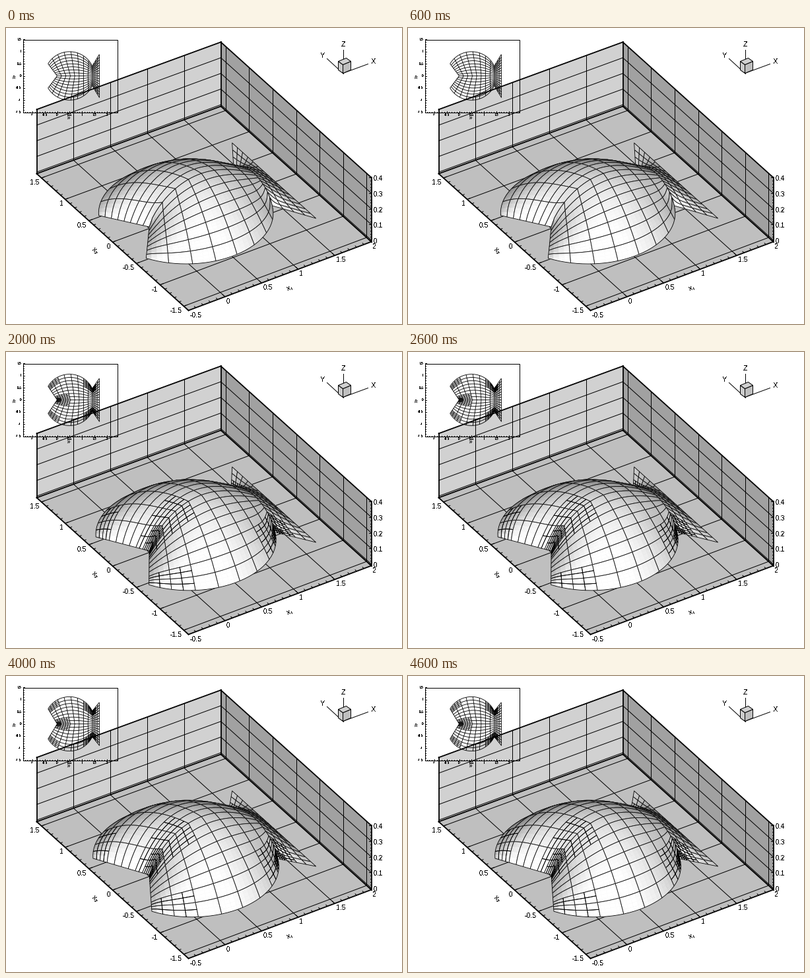
Recreate the animation shown at these times as a matplotlib script. Size 600 by 448 pixels, loop 5000 ms.

```python
import numpy as np
import matplotlib.pyplot as plt
from matplotlib.animation import FuncAnimation
from matplotlib.collections import LineCollection, PolyCollection

W, H, DPI = 600, 448, 100
PX = 72 / DPI
plt.rcParams["font.family"] = "Liberation Sans"
plt.rcParams["text.antialiased"] = False

STEPS = 5
NU, NECK, NV, SUB = 12, 8, 8, 4      # columns, dome columns, rows per half, fine cells
X0, X1, Y0, Y1 = -0.5, 2.0, -1.6, 1.6
Z0, Z1, ZPX = -0.01, 0.4, 237
VIEW = np.array([-0.443, -0.682, 0.58])
ZSCALE = 2.22


def project(x, y, z):
    a, b = (x - X0) / (X1 - X0), (y - Y0) / (Y1 - Y0)
    px = 276 + 277 * a - 230 * b + 2 * a * b
    py = 427 - 104 * a - 207 * b + 2 * a * b - ZPX * (z - Z0)
    return np.stack([px, py], -1)


def half_mesh(shift):
    """Upper half of the domain: notch, shifted circle, flared end."""
    u = np.linspace(0, NU, NU * SUB + 1)
    v = np.linspace(0, 1, NV * SUB + 1)
    axis = np.interp(u, [0, NECK, NU], [0, 1.42, 1.7])
    ang = np.radians(np.interp(u, [0, NECK], [150, 24]))
    t = np.clip((u - NECK) / (NU - NECK), 0, 1)
    rx = (0.5 + np.cos(ang)) * (1 - t) + 1.7 * t
    ry = (np.sin(ang) + shift) * (1 - t) + 0.89 * t
    return axis[:, None] + np.outer(rx - axis, v), np.outer(ry, v)


def poisson(x, y):
    """Bilinear elements for -lap(u) = 1, zero on the outer boundary."""
    idx = np.arange(x.size).reshape(x.shape)
    conn = np.stack([idx[:-1, :-1], idx[1:, :-1], idx[1:, 1:], idx[:-1, 1:]], -1).reshape(-1, 4)
    ex, ey = x.ravel()[conn], y.ravel()[conn]
    K, f = np.zeros((x.size, x.size)), np.zeros(x.size)
    g = 1 / np.sqrt(3)
    sx, sy = np.array([-1, 1, 1, -1]), np.array([-1, -1, 1, 1])
    ke = 0
    for p in (-g, g):
        for q in (-g, g):
            n = (1 + sx * p) * (1 + sy * q) / 4
            dp, dq = sx * (1 + sy * q) / 4, sy * (1 + sx * p) / 4
            a, b, c, d = ex @ dp, ey @ dp, ex @ dq, ey @ dq
            det = a * d - b * c
            gx = (np.outer(d, dp) - np.outer(b, dq)) / det[:, None]
            gy = (np.outer(a, dq) - np.outer(c, dp)) / det[:, None]
            w = np.abs(det)[:, None]
            ke = ke + w[:, :, None] * (gx[:, :, None] * gx[:, None] + gy[:, :, None] * gy[:, None])
            np.add.at(f, conn, w * n)
    np.add.at(K, (conn[:, :, None], conn[:, None, :]), ke)
    free = idx[1:-1, :-1].ravel()
    z = np.zeros(x.size)
    z[free] = np.linalg.solve(K[np.ix_(free, free)], f[free])
    return z.reshape(x.shape)


def level(i, r, step):
    """Refinement of column i, row r counted from the symmetry line."""
    if step == 0:
        return 0
    out = NV - 1 - r
    if step > 1 and ((i == 0 and r == 0) or (i in (7, 8) and out == 0)):
        return 2
    tip = i < 2 and out < 2 and i + out < 1 + min(step, 2)
    corner = i < 3 and r < 2
    neck = 6 <= i <= 9 and out < 3
    return int(tip or corner or neck)


def loop(a, i, j, n):
    """Nodes around a block of n by n fine cells."""
    return np.concatenate([a[i:i + n, j], a[i + n, j:j + n],
                           a[i + n:i:-1, j + n], a[i, j + n:j:-1]])


def build(step):
    x, y = half_mesh(0.03 * step)
    z = poisson(x, y)
    x = np.hstack([x[:, :0:-1], x])
    y = np.hstack([-y[:, :0:-1], y])
    z = np.hstack([z[:, :0:-1], z])
    scr = project(x, y, z)
    plan = np.stack([77 + 37.6 * x, 72 - 36.7 * y], -1)

    pts = np.stack([x, y, z * ZSCALE], -1)
    nrm = np.cross(pts[1:, 1:] - pts[:-1, :-1], pts[:-1, 1:] - pts[1:, :-1])
    nrm /= np.linalg.norm(nrm, axis=-1, keepdims=True)
    shade = np.clip(0.44 + 0.62 * np.clip(nrm @ VIEW, 0, 1), 0, 1)

    depth = x * VIEW[0] + y * VIEW[1]
    mid = depth[SUB // 2::SUB, SUB // 2::SUB]
    polys, face, edge, width, flat = [], [], [], [], []
    for k in np.argsort(mid, axis=None):
        ci, cj = divmod(int(k), 2 * NV)
        i0, j0 = ci * SUB, cj * SUB
        for i in range(i0, i0 + SUB):
            for j in range(j0, j0 + SUB):
                polys.append(loop(scr, i, j, 1))
                col = (shade[i, j],) * 3 + (1,)
                face.append(col)
                edge.append(col)
                width.append(0.6 * PX)
        row = cj - NV if cj >= NV else NV - 1 - cj
        n = SUB >> level(ci, row, step)
        for i in range(i0, i0 + SUB, n):
            for j in range(j0, j0 + SUB, n):
                polys.append(loop(scr, i, j, n))
                face.append((0, 0, 0, 0))
                edge.append((0, 0, 0, 1))
                width.append(0.85 * PX)
                # each block adds two sides; the outer rim closes the rest
                flat.append(np.vstack([plan[i, j:j + n + 1][::-1], plan[i + 1:i + n + 1, j]]))
    flat += [plan[:, -1], plan[-1]]
    return polys, face, edge, width, flat


fig = plt.figure(figsize=(W / DPI, H / DPI), dpi=DPI, facecolor="white")
ax = fig.add_axes([0, 0, 1, 1])
ax.set_xlim(-0.5, W - 0.5)
ax.set_ylim(H - 0.5, -0.5)
ax.axis("off")


def line(p, q, lw=1, z=1):
    ax.plot([p[0], q[0]], [p[1], q[1]], color="black", lw=lw * PX,
            zorder=z, solid_capstyle="projecting")


def line3(p, q, lw=1):
    line(project(*p), project(*q), lw)


def poly(points, grey, lw=0, z=0.5):
    ax.add_patch(plt.Polygon(points, facecolor=grey, edgecolor="black" if lw else "none",
                             lw=lw * PX, zorder=z))


def label(x, y, s, size=10.5, ha="center", rot=0, z=2):
    ax.text(x, y, s, fontsize=size * PX, ha=ha, va="center", rotation=rot,
            rotation_mode="anchor", zorder=z)


def draw_box():
    poly([project(*p) for p in ((X0, Y0, Z0), (X1, Y0, Z0), (X1, Y1, Z0), (X0, Y1, Z0))], "0.75")
    poly([project(*p) for p in ((X0, Y1, Z0), (X1, Y1, Z0), (X1, Y1, Z1), (X0, Y1, Z1))], "0.82")
    poly([project(*p) for p in ((X1, Y0, Z0), (X1, Y1, Z0), (X1, Y1, Z1), (X1, Y0, Z1))], "0.63")
    for x in np.arange(0, 2, 0.5):
        line3((x, Y0, Z0), (x, Y1, Z0))
        line3((x, Y1, Z0), (x, Y1, Z1))
    for y in np.arange(-1.5, 1.6, 0.5):
        line3((X0, y, Z0), (X1, y, Z0))
        line3((X1, y, Z0), (X1, y, Z1))
    for z in np.arange(0, 0.35, 0.1):
        line3((X0, Y1, z), (X1, Y1, z))
        line3((X1, Y0, z), (X1, Y1, z))
    for z in (Z0, Z1):
        line3((X0, Y1, z), (X1, Y1, z), 1.8)
        line3((X1, Y1, z), (X1, Y0, z), 1.8)
    line3((X0, Y0, Z0), (X1, Y0, Z0), 1.8)
    line3((X0, Y0, Z0), (X0, Y1, Z0), 1.8)
    for x, y in ((X0, Y1), (X1, Y1), (X1, Y0)):
        line3((x, y, Z0), (x, y, Z1), 1.8)


def draw_axes():
    for k in range(-5, 21):
        p = project(k / 10, Y0, Z0)
        major = k % 5 == 0
        n = 5 if major else 3
        line(p, p + n * np.array([-0.74, -0.67]))
        if major:
            label(p[0] + 2, p[1] + 7, f"{k / 10:g}", ha="left")
    for k in range(-16, 17):
        p = project(X0, k / 10, Z0)
        major = k % 5 == 0
        n = 5 if major else 3
        line(p, p + n * np.array([0.94, -0.35]))
        if major:
            label(p[0] - 3, p[1] + 7, f"{k / 10:g}", ha="right")
    for k in range(0, 21):
        p = project(X1, Y0, k / 50)
        major = k % 5 == 0
        line(p, p - np.array([4 if major else 2, 0]))
        if major:
            label(p[0] + 3, p[1] + 2, f"{k / 50:g}", ha="left")
    label(430, 394, r"$\mathregular{X_1}$", 9, rot=20)
    label(134, 337, r"$\mathregular{X_2}$", 9, rot=-42)


def draw_triad():
    o = np.array([510, 68])
    ex, ey, ez = np.array([12, -5]), np.array([-7, -5]), np.array([0, -13])
    for end, name, pos in (((548, 54), "X", (556, 50)), ((486, 46), "Y", (479, 41)),
                           ((510, 32), "Z", (510, 24))):
        line(o, end)
        label(*pos, name, 11)
    poly([o, o + ey, o + ey + ez, o + ez], "0.8", 1, 1.5)
    poly([o, o + ex, o + ex + ez, o + ez], "0.75", 1, 1.5)
    poly([o + ez, o + ex + ez, o + ex + ey + ez, o + ey + ez], "0.82", 1, 1.5)


def draw_inset():
    poly([(25, 17), (168, 17), (168, 127), (25, 127)], "none", 1, 4)
    for k in range(-2, 5):
        x = 77 + 37.6 * k / 2
        line((x, 127), (x, 125), z=5)
        label(x, 131, f"{k / 2:g}", 5, z=5)
    for k in range(-3, 4):
        y = 72 - 36.7 * k / 2
        line((25, y), (27, y), z=5)
        label(23, y, f"{k / 2:g}", 5, "right", z=5)
    for k in range(-13, 25):
        x = 77 + 3.76 * k
        line((x, 127), (x, 126), z=5)
    for k in range(-14, 15):
        y = 72 - 3.67 * k
        line((25, y), (26, y), z=5)
    label(95, 136, r"$\mathregular{X_1}$", 5, z=5)
    label(13, 73, r"$\mathregular{X_2}$", 5, rot=90, z=5)


draw_box()
draw_axes()
draw_triad()
draw_inset()

surface = PolyCollection([], zorder=3)
plan_mesh = LineCollection([], colors="black", linewidths=0.85 * PX, zorder=6)
ax.add_collection(surface, autolim=False)
ax.add_collection(plan_mesh, autolim=False)

states = [build(k) for k in range(STEPS)]


def update(k):
    polys, face, edge, width, flat = states[k]
    surface.set_verts(polys)
    surface.set_facecolor(face)
    surface.set_edgecolor(edge)
    surface.set_linewidth(width)
    plan_mesh.set_segments(flat)
    return surface, plan_mesh


anim = FuncAnimation(fig, update, frames=STEPS, interval=1000, repeat=True, repeat_delay=0)
plt.show()
```
